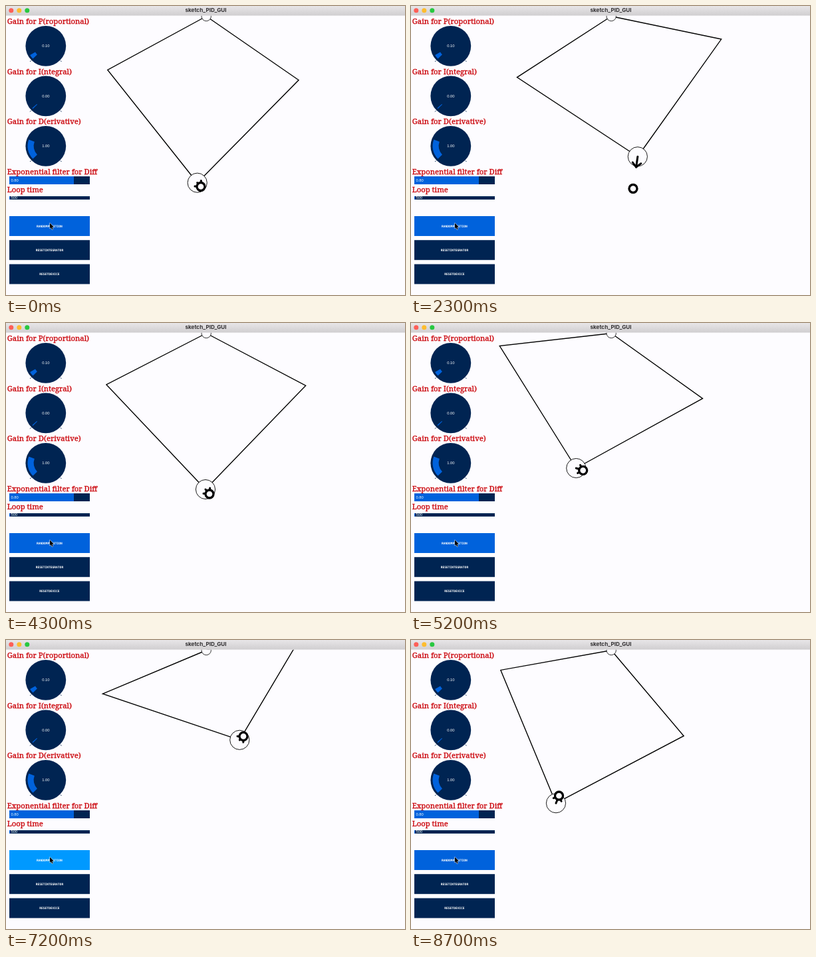
Recreate the animation shown at these times as an HTML page with a canvas. Size 600x436 px, loop 8.8 s.

```html
<!DOCTYPE html>
<html lang="en">
<head>
<meta charset="utf-8">
<title>sketch_PID_GUI</title>
<style>
  html, body { margin: 0; width: 100%; height: 100%; overflow: hidden; background: #fdfcff; }
  canvas { display: block; width: 600px; height: 436px; }
</style>
</head>
<body>
<canvas id="stage"></canvas>
<script>
const W = 600, H = 436, LOOP = 8800, STEP = 100;
const BG = '#fdfcff', NAVY = '#002452', BLUE = '#0062dc', BRIGHT = '#0099ff', RED = '#cc0a10';
const BASE = { x: 301.2, y: 15.5 }, UPPER = 169, LOWER = 217.3, TOP = 14.5;
const LEFT = 5, WIDE = 121;
const PRESS = 120, EASE = 50, MAX_ARROW = 16;

// Each move: start time, target ring, and where the end effector settles.
const moves = [
  { at: -2000, ring: [293, 272.5], rest: [287.7, 266.7] },
  { at: 300, ring: [358, 197.3], rest: [346.7, 200] },
  { at: 1300, ring: [347, 225], rest: [342.5, 216] },
  { at: 2256, ring: [334, 275.5], rest: [335, 267] },
  { at: 2600, ring: [221.5, 247], rest: [232, 247] },
  { at: 3700, ring: [306, 258], rest: [300, 251] },
  { at: 4500, ring: [258.7, 222.3], rest: [248.3, 219] },
  { at: 5500, ring: [280, 243], rest: [272, 235] },
  { at: 6390, ring: [357, 145.3], rest: [351.3, 150.8] },
  { at: 7300, ring: [222.5, 235], rest: [218, 246.2] }
];

const canvas = document.getElementById('stage');
const ctx = canvas.getContext('2d');
const dpr = window.devicePixelRatio || 1;
canvas.width = W * dpr;
canvas.height = H * dpr;

function box(x, y, w, h, color) {
  ctx.fillStyle = color;
  ctx.fillRect(x, y, w, h);
}

function disc(x, y, r, fill, stroke, width) {
  ctx.beginPath();
  ctx.arc(x, y, r, 0, Math.PI * 2);
  ctx.fillStyle = fill;
  ctx.fill();
  if (!stroke) return;
  ctx.strokeStyle = stroke;
  ctx.lineWidth = width;
  ctx.stroke();
}

function path(points, color, width) {
  ctx.beginPath();
  points.forEach(p => ctx.lineTo(p.x, p.y));
  ctx.strokeStyle = color;
  ctx.lineWidth = width;
  ctx.stroke();
}

function label(text, x, y, font, color, align = 'left', baseline = 'alphabetic') {
  ctx.font = font;
  ctx.fillStyle = color;
  ctx.textAlign = align;
  ctx.textBaseline = baseline;
  ctx.fillText(text, x, y);
}

// A hairline outline gives the captions a medium weight.
function caption(text, y) {
  label(text, 1.8, y, '11.25px "Noto Serif", serif', RED);
  ctx.strokeStyle = RED;
  ctx.lineWidth = 0.35;
  ctx.strokeText(text, 1.8, y);
}

const value = (text, x, y, align) =>
  label(text, x, y, '5.8px "Liberation Sans", sans-serif', '#fff', align, 'middle');

function polar(x, y, r, deg) {
  const a = deg * Math.PI / 180;
  return { x: x + r * Math.cos(a), y: y + r * Math.sin(a) };
}

function knob(y, text, sweep) {
  const x = 59.8, from = 135, rad = Math.PI / 180;
  disc(x, y, 30.4, NAVY);
  ctx.beginPath();
  ctx.arc(x, y, 27.3, from * rad, (from + sweep) * rad);
  ctx.arc(x, y, 18.2, (from + sweep) * rad, from * rad, true);
  ctx.fillStyle = BLUE;
  ctx.fill();
  for (const deg of [45, 135])
    path([polar(x, y, 31.5, deg), polar(x, y, 33.5, deg)], NAVY, 1);
  value(text, x, y + 0.3, 'center');
}

function slider(y, h, fill, text, textY) {
  box(LEFT, y, WIDE, h, NAVY);
  box(LEFT, y, fill, h, BLUE);
  value(text, 7.5, textY, 'left');
}

function button(y, text, color) {
  box(LEFT, y, WIDE, 30, color);
  label(text, 65.4, y + 15.5, '700 4.6px "DejaVu Sans Mono", monospace', '#fff', 'center', 'middle');
}

function titleBar() {
  const shade = ctx.createLinearGradient(0, 0, 0, TOP);
  shade.addColorStop(0, '#e8e6e8');
  shade.addColorStop(1, '#d0ced0');
  box(0, 0, W, TOP, shade);
  ['#fe5f57', '#febc2e', '#28c840'].forEach((c, i) => disc(7.8 + i * 12, 6.7, 3.5, c));
  label('sketch_PID_GUI', 300.5, 9.4, '700 8.2px Inter, sans-serif', '#333133', 'center');
}

function panel(pressed) {
  caption('Gain for P(roportional)', 27);
  caption('Gain for I(ntegral)', 102.5);
  caption('Gain for D(erivative)', 178);
  caption('Exponential filter for Diff', 253.5);
  caption('Loop time', 281);
  knob(60.3, '0.10', 15);
  knob(135.8, '0.00', 3);
  knob(211.3, '1.00', 66);
  slider(257, 12, 97, '0.80', 263.3);
  slider(287, 5, 1.2, '500', 289.8);
  button(317, 'RANDOMPOSITION', pressed ? BRIGHT : BLUE);
  button(353.2, 'RESETINTEGRATOR', NAVY);
  button(389.5, 'RESETDEVICE', NAVY);
}

function pointer(x, y) {
  ctx.beginPath();
  [[0, 0], [0, 8.4], [1.8, 6.8], [3.1, 9.8], [4.6, 9.2], [3.3, 6.2], [5.8, 6]]
    .forEach(([dx, dy]) => ctx.lineTo(x + dx, y + dy));
  ctx.closePath();
  ctx.strokeStyle = '#fff';
  ctx.lineWidth = 1;
  ctx.stroke();
  ctx.fillStyle = '#000';
  ctx.fill();
}

// Elbow of a two-bar arm from the base to p; side is -1 (left) or 1 (right).
function elbow(p, side) {
  const dx = p.x - BASE.x, dy = p.y - BASE.y, d = Math.hypot(dx, dy);
  const along = (UPPER ** 2 - LOWER ** 2 + d * d) / (2 * d);
  const off = side * Math.sqrt(Math.max(0, UPPER ** 2 - along ** 2));
  return {
    x: BASE.x + (along * dx + off * dy) / d,
    y: BASE.y + (along * dy - off * dx) / d
  };
}

function arrow(p, ring) {
  const angle = Math.atan2(ring.y - p.y, ring.x - p.x) * 180 / Math.PI;
  const length = Math.min(Math.hypot(ring.x - p.x, ring.y - p.y), MAX_ARROW);
  const tip = polar(p.x, p.y, length, angle);
  path([p, tip], '#000', 3);
  path([polar(tip.x, tip.y, 9, angle + 135), tip, polar(tip.x, tip.y, 9, angle - 135)], '#000', 3);
}

function pose(t) {
  const p = { x: moves[0].rest[0], y: moves[0].rest[1] };
  let ring = moves[0].ring;
  for (const m of moves) {
    if (t < m.at) break;
    const u = (t - m.at) / EASE, k = 1 - (1 + u) * Math.exp(-u);
    p.x += (m.rest[0] - p.x) * k;
    p.y += (m.rest[1] - p.y) * k;
    ring = m.ring;
  }
  return { p, ring: { x: ring[0], y: ring[1] } };
}

function linkage(t) {
  const { p, ring } = pose(t);
  ctx.save();
  ctx.beginPath();
  ctx.rect(0, TOP, W, H);
  ctx.clip();
  ctx.lineJoin = 'miter';
  path([BASE, elbow(p, -1), p], '#000', 1.4);
  path([BASE, elbow(p, 1), p], '#000', 1.4);
  disc(BASE.x, BASE.y, 7.2, BG, '#000', 0.8);
  disc(p.x, p.y, 14.6, BG, '#000', 0.9);
  ctx.lineCap = 'round';
  ctx.lineJoin = 'round';
  arrow(p, ring);
  disc(ring.x, ring.y, 6, BG, '#000', 3.3);
  ctx.restore();
}

function draw(now) {
  const t = Math.floor((now % LOOP) / STEP) * STEP;
  const pressed = moves.some(m => t >= m.at - PRESS && t < m.at);
  ctx.setTransform(dpr, 0, 0, dpr, 0, 0);
  box(0, 0, W, H, BG);
  linkage(t);
  titleBar();
  panel(pressed);
  pointer(66, 327.5);
  requestAnimationFrame(() => draw(performance.now() - start));
}

const start = performance.now();
draw(0);
</script>
</body>
</html>
```
